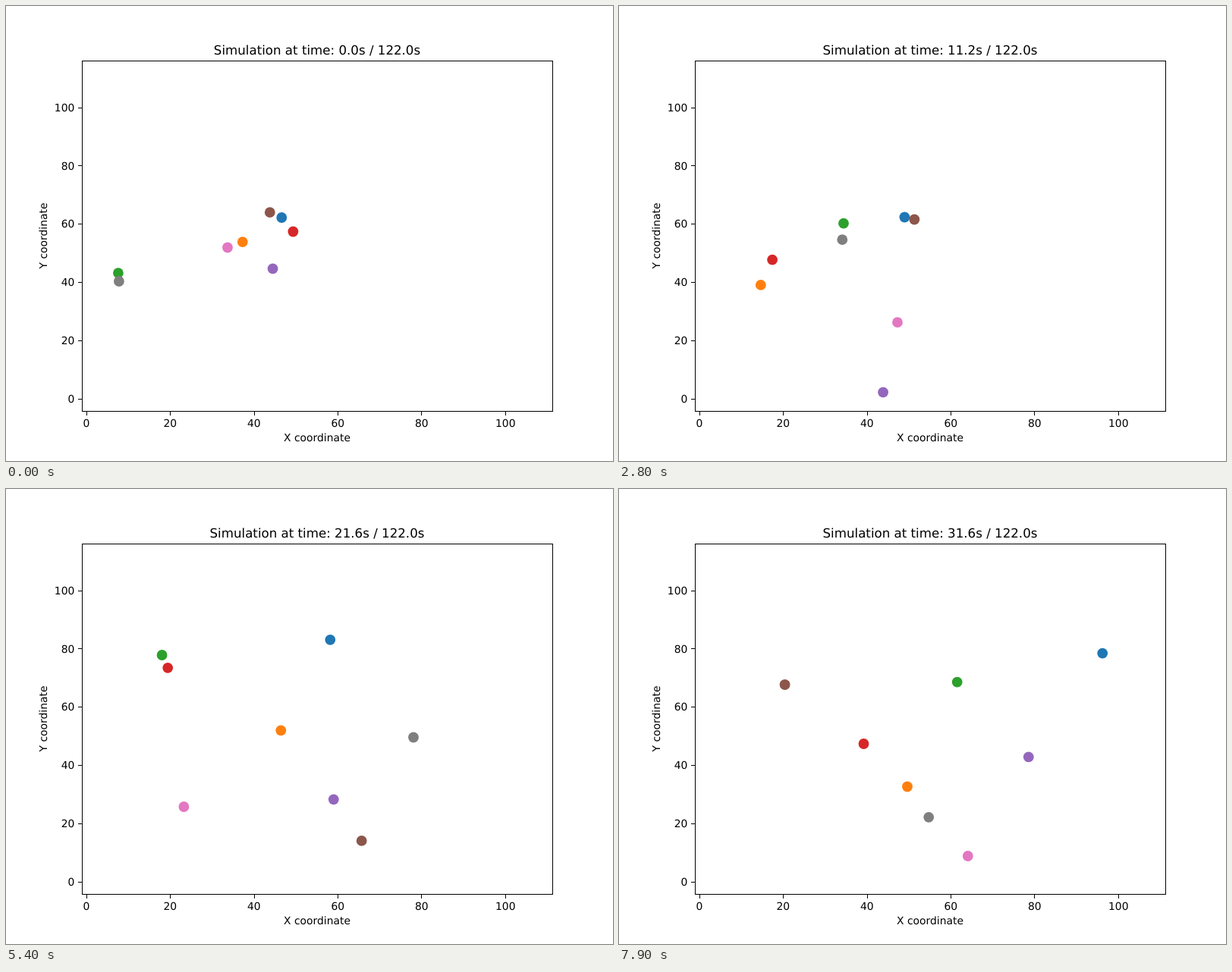
An HTML page that plays this animation: 800x600 px, repeating every 8000 ms.

```html
<!DOCTYPE html>
<html lang="en">
<head>
<meta charset="utf-8">
<title>Simulation</title>
<style>
  html, body { margin: 0; width: 100%; height: 100%; overflow: hidden; background: #fff; }
  svg { display: block; }
  text { font: 13.89px "DejaVu Sans", sans-serif; text-anchor: middle; text-rendering: geometricPrecision; }
  .title { font-size: 16.67px; }
  .end { text-anchor: end; }
  .line { fill: none; stroke: #000; stroke-width: 1; shape-rendering: crispEdges; }
</style>
</head>
<body>
<svg width="800" height="600" viewBox="0 0 800 600">
  <clipPath id="area"><rect x="100" y="72" width="620" height="462"/></clipPath>
  <g id="dots" clip-path="url(#area)"></g>
  <g id="axes"><rect class="line" x="100.5" y="72.5" width="620" height="462"/></g>
  <text class="title" id="title" x="410" y="63.8"></text>
  <text x="410" y="574">X coordinate</text>
  <text transform="translate(54 303) rotate(-90)">Y coordinate</text>
</svg>
<script>
const LOOP = 8000, STEP = 100, SIM_STEP = 0.4, SIM_END = 122;
const TIMES = [0, 1200, 2800, 3800, 5400, 6500, 7900];

// Positions at TIMES; turnX and turnY add [time, value] points between them.
const BALLS = [
  { color: '#1f77b4', x: [363.3, 343.6, 376.4, 401, 427.3, 591.8, 637.2],
    y: [279, 323.5, 278.5, 219.7, 198.8, 121, 216.6], turnX: [[7200, 615]] },
  { color: '#ff7f0e', x: [311.8, 286.6, 186.8, 155.2, 362.3, 446, 380],
    y: [311.1, 338.2, 367.9, 306, 318.4, 375.8, 392.5], turnX: [[3500, 145]] },
  { color: '#2ca02c', x: [147.9, 216.7, 296, 337.1, 205.6, 279.6, 445.7],
    y: [352.1, 298.4, 286.7, 295.5, 219, 236.2, 254.6], turnX: [[400, 121]] },
  { color: '#d62728', x: [378.4, 241.3, 202.1, 291, 213.2, 243.9, 322.5],
    y: [297.5, 270.7, 334.7, 309.6, 235.8, 212.7, 336], turnX: [[1800, 175], [2100, 170]] },
  { color: '#9467bd', x: [351.6, 391.2, 348.1, 360.1, 431.8, 469.9, 539.8],
    y: [346.4, 443.5, 509.4, 525.4, 409.3, 356.5, 353.4],
    turnY: [[900, 409], [1800, 488], [3400, 530], [4500, 501]] },
  { color: '#8c564b', x: [347.8, 284.2, 389.3, 436, 468.7, 234.4, 218.6],
    y: [272.1, 284, 281.5, 337, 463.9, 462.5, 258],
    turnX: [[7000, 206]], turnY: [[5900, 483], [6300, 476]] },
  { color: '#e377c2', x: [292, 344.7, 367, 280.2, 234.4, 367.5, 459.8],
    y: [318.5, 388, 417.2, 435.6, 419, 417.3, 484], turnY: [[7700, 487]] },
  { color: '#7f7f7f', x: [148.9, 225.8, 294.3, 357.3, 537, 581.8, 408.2],
    y: [363, 343.2, 308.2, 279.5, 327.5, 418.4, 432.8], turnX: [[400, 140], [6200, 587]] },
];

function add(parent, name, attrs, text = '') {
  const node = document.createElementNS('http://www.w3.org/2000/svg', name);
  for (const key in attrs) node.setAttribute(key, attrs[key]);
  node.textContent = text;
  return parent.appendChild(node);
}

// Smooth curve through knots with uneven spacing (cubic Hermite).
function curve(values, turns = []) {
  const knots = TIMES.map((t, i) => [t, values[i]]).concat(turns).sort((a, b) => a[0] - b[0]);
  const last = knots.length - 1;
  const gap = i => knots[i + 1][0] - knots[i][0];
  const rate = i => (knots[i + 1][1] - knots[i][1]) / gap(i);
  const inner = i => (rate(i - 1) * gap(i) + rate(i) * gap(i - 1)) / (gap(i - 1) + gap(i));
  const slope = i =>
    i === 0 ? 1.5 * rate(0) - 0.5 * inner(1) :
    i === last ? 1.5 * rate(last - 1) - 0.5 * inner(last - 1) : inner(i);
  return t => {
    let i = 0;
    while (i < last - 1 && t >= knots[i + 1][0]) i++;
    const h = gap(i), u = (t - knots[i][0]) / h, v = 1 - u;
    return knots[i][1] * v * v * (1 + 2 * u) + knots[i + 1][1] * u * u * (1 + 2 * v)
      + h * u * v * (slope(i) * v - slope(i + 1) * u);
  };
}

const axes = document.getElementById('axes');
for (let k = 0; k < 6; k++) {
  const x = 105.6 + 110.47 * k, y = 517.9 - 76.87 * k;
  const px = Math.round(x) + 0.5, py = Math.round(y) + 0.5;
  add(axes, 'path', { class: 'line', d: `M${px} 535v5M${100} ${py}h-5` });
  add(axes, 'text', { x: x + 0.3, y: 555 }, k * 20);
  add(axes, 'text', { x: 90.3, y: y + 5.2, class: 'end' }, k * 20);
}

const dots = document.getElementById('dots');
const balls = BALLS.map(b => ({
  node: add(dots, 'circle', { r: 6.9, fill: b.color }),
  x: curve(b.x, b.turnX),
  y: curve(b.y, b.turnY),
}));
const title = document.getElementById('title');

function draw(now) {
  const step = Math.floor((now % LOOP) / STEP), t = step * STEP;
  title.textContent = `Simulation at time: ${(step * SIM_STEP).toFixed(1)}s / ${SIM_END.toFixed(1)}s`;
  for (const b of balls) {
    b.node.setAttribute('cx', b.x(t).toFixed(2));
    b.node.setAttribute('cy', b.y(t).toFixed(2));
  }
}

const start = performance.now();
function tick() {
  draw(performance.now() - start);
  requestAnimationFrame(tick);
}
tick();
</script>
</body>
</html>
```
